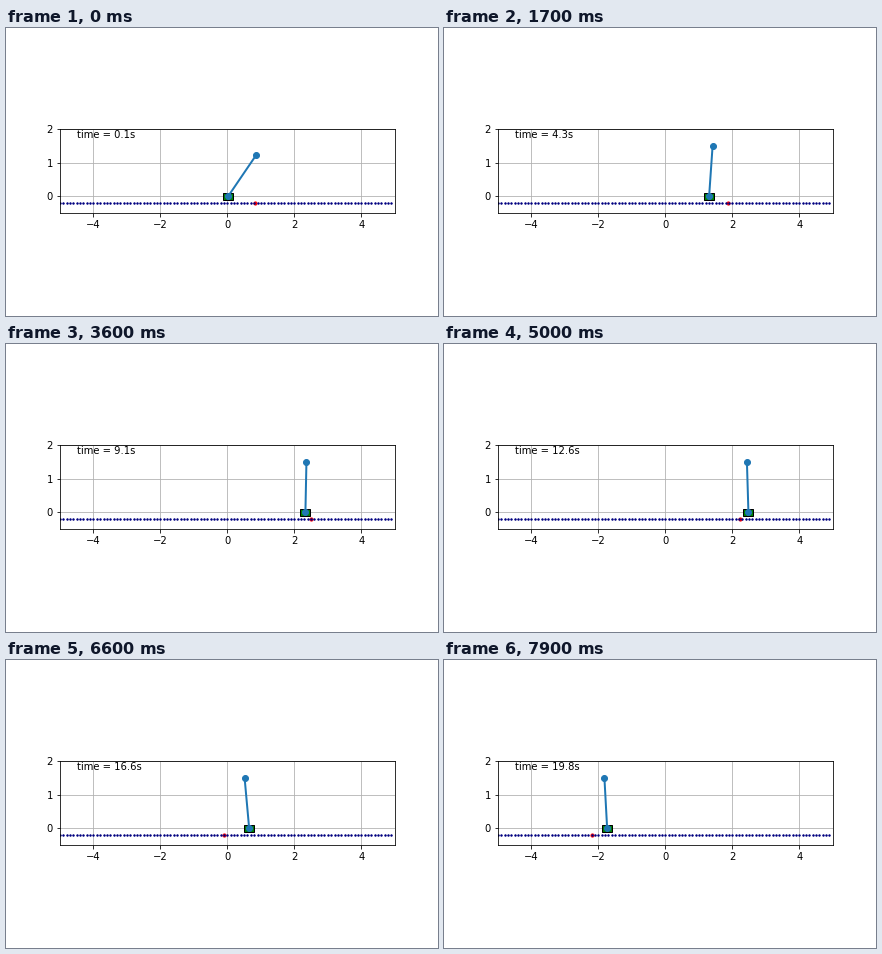
Write a matplotlib script that moves like this. It is 432 px wide and 288 px high and loops after 8000 ms.

```python
import numpy as np
import matplotlib.pyplot as plt
from matplotlib.animation import FuncAnimation
from matplotlib.patches import Rectangle

FRAMES, INTERVAL = 80, 100
DT, STRIDE = 0.05, 5
POLE = 1.5
CART_W, CART_H = 0.3, 0.2
TRACK_Y = -0.2
LEAN = 0.12        # tilt per unit of distance to the goal
START_TILT = 0.5   # extra tilt the cart has to catch
CATCH, CATCH_TIME = 2.0, 0.4

# time, goal position, cart position
WAYPOINTS = np.array([
    (0.05, 0.83, 0.02),
    (4.3, 1.88, 1.30),
    (7.05, 2.24, 2.20),
    (9.05, 2.50, 2.33),
    (12.55, 2.23, 2.48),
    (16.55, -0.10, 0.65),
    (19.8, -2.19, -1.74),
])
KNOTS, PLACES = WAYPOINTS[:, 0], WAYPOINTS[:, 1:]
SLOPES = np.gradient(PLACES, KNOTS, axis=0)


def travel(t):
    """Goal and cart position on a smooth path through the waypoints."""
    k = np.clip(np.searchsorted(KNOTS, t, side="right") - 1, 0, len(KNOTS) - 2)
    h = KNOTS[k + 1] - KNOTS[k]
    u = (t - KNOTS[k]) / h
    a = PLACES[k] * (1 + 2 * u) + SLOPES[k] * h * u
    b = PLACES[k + 1] * (3 - 2 * u) - SLOPES[k + 1] * h * (1 - u)
    return a * (1 - u) ** 2 + b * u ** 2


def state(t):
    """Goal, cart and pole angle; the cart first darts under the falling pole."""
    goal, x = travel(t)
    s = (t - DT) / CATCH_TIME
    x += CATCH * s ** 2 * np.exp(-s)
    angle = LEAN * (goal - x) + START_TILT * (1 + s) * np.exp(-s)
    return goal, x, angle


fig = plt.figure(figsize=(6, 4), dpi=72, facecolor="white")
fig.subplots_adjust(left=0.125, right=0.9, bottom=0.125, top=0.88)
ax = fig.add_subplot(xlim=(-5, 5), ylim=(-0.5, 2), aspect="equal")
ax.set_xticks(range(-4, 5, 2))
ax.set_yticks(range(3))
ax.grid()

track = np.arange(-5, 5, 0.1)
target = ax.scatter([0], [TRACK_Y], s=10, color="red", zorder=1.5)
ax.scatter(track, np.full_like(track, TRACK_Y), s=2, color="navy", zorder=1.6)
cart = ax.add_patch(Rectangle((0, 0), CART_W, CART_H, linewidth=1,
                              edgecolor="k", facecolor="g", zorder=1.7))
pole, = ax.plot([], [], "o-", color="tab:blue", lw=2, markersize=6)
clock = ax.text(0.05, 0.9, "", transform=ax.transAxes)


def draw(frame):
    t = (1 + STRIDE * frame) * DT
    goal, x, angle = state(t)
    target.set_offsets([(goal, TRACK_Y)])
    cart.set_xy((x - CART_W / 2, -CART_H / 2))
    pole.set_data([x, x + POLE * np.sin(angle)], [0, POLE * np.cos(angle)])
    clock.set_text("time = %.1fs" % t)
    return target, cart, pole, clock


anim = FuncAnimation(fig, draw, frames=FRAMES, interval=INTERVAL,
                     repeat=True, repeat_delay=0, blit=False)
plt.show()
```
